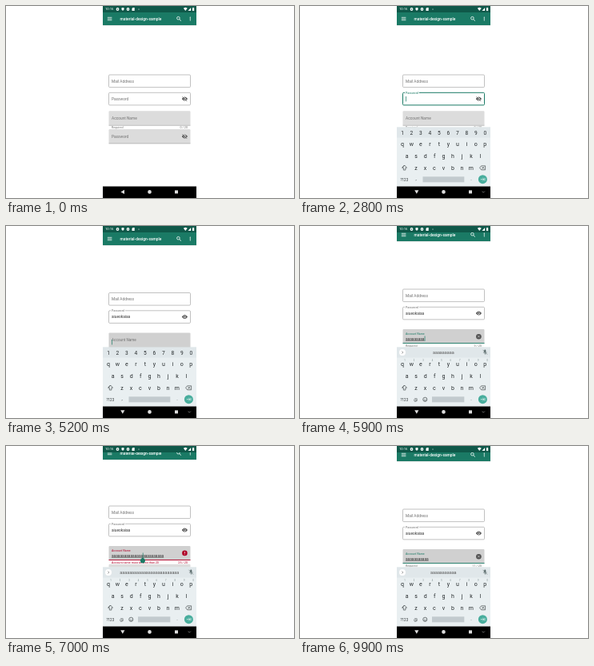
Write an HTML page with a canvas that moves like this. It is 360 px wide and 240 px high and loops after 10000 ms.

```html
<!DOCTYPE html>
<html lang="en">
<head>
<meta charset="utf-8">
<title>Text fields</title>
<style>
html, body { margin: 0; width: 100%; height: 100%; overflow: hidden; background: #fff; }
canvas { display: block; width: 360px; height: 240px; }
</style>
</head>
<body>
<canvas id="stage"></canvas>
<script>
const LOOP = 10000, STEP = 100;
const TEAL = '#1a7a65', DARK = '#0f5849', RED = '#b00028', INK = '#303030', GREY = '#707070';
const LEFT = 128.5, WIDTH = 102, PAD = 132, ICON_X = 223.4;
const SECRET = 'aiueokaiaa';

const canvas = document.getElementById('stage');
const ctx = canvas.getContext('2d');
const dpr = window.devicePixelRatio || 1;
canvas.width = 360 * dpr;
canvas.height = 240 * dpr;

const clamp = (v, lo, hi) => Math.min(hi, Math.max(lo, v));
const mix = (a, b, k) => a + (b - a) * k;
const ease = (t, from, to) => {
  const k = clamp((t - from) / (to - from), 0, 1);
  return k * k * (3 - 2 * k);
};

function rect(x, y, w, h, color) {
  ctx.fillStyle = color;
  ctx.fillRect(x, y, w, h);
}

function round(x, y, w, h, r) {
  ctx.beginPath();
  ctx.roundRect(x, y, w, h, r);
}

function dot(x, y, r, color) {
  ctx.fillStyle = color;
  ctx.beginPath();
  ctx.arc(x, y, r, 0, 7);
  ctx.fill();
}

function ring(x, y, r, color, w) {
  ctx.strokeStyle = color;
  ctx.lineWidth = w;
  ctx.beginPath();
  ctx.arc(x, y, r, 0, 7);
  ctx.stroke();
}

function trace(points) {
  ctx.beginPath();
  for (let i = 0; i < points.length; i += 2) ctx.lineTo(points[i], points[i + 1]);
}

function line(points, color, w) {
  ctx.strokeStyle = color;
  ctx.lineWidth = w;
  trace(points);
  ctx.stroke();
}

function poly(points, color) {
  ctx.fillStyle = color;
  trace(points);
  ctx.fill();
}

// Vertically centred on the x-height; returns the width.
function text(str, x, y, size, color, align = 'left', weight = 400) {
  ctx.font = `${weight} ${size}px Roboto, sans-serif`;
  ctx.textAlign = align;
  ctx.textBaseline = 'alphabetic';
  ctx.fillStyle = color;
  ctx.fillText(str, x, y + size * 0.35);
  return ctx.measureText(str).width;
}

function state(t) {
  const s = { t };
  s.focus = t < 300 ? '' : t < 2400 ? 'mail' : t < 5100 ? 'pass' : 'name';
  s.mail = clamp(t <= 1700 ? Math.floor((t - 600) / 200) : 5 - (t - 1700) / 100, 0, 5);
  s.pass = clamp(Math.floor((t - 2750) / 150), 0, SECRET.length);
  s.shown = t >= 4700;

  if (t < 7700) s.name = clamp(Math.floor((t - 5450) / 46), 0, 25);
  else if (t < 8700) s.name = Math.max(0, 25 - (t - 7600) / 100 * 4);
  else s.name = t >= 9900 ? 11 : Math.min(10, (t - 8700) / 100);
  s.error = s.name > 20;
  s.handle = t >= 6900 && t < 7700;

  const grow = ease(t, 2800, 3100), scroll = ease(t, 5250, 5550);
  const wrap = ease(t, 6350, 6550) - ease(t, 7700, 8000);
  s.mailY = 86 - 2.5 * grow - 4.5 * scroll - 4 * wrap;
  s.passY = s.mailY + 22.3;
  s.nameY = s.passY + 23 + 4.6 * grow;
  s.barY = -5 * scroll - 2 * wrap;

  s.mailFloat = ease(t, 250, 480) - ease(t, 2350, 2580);
  s.passFloat = ease(t, 2350, 2580);
  s.nameFloat = ease(t, 5150, 5400);
  s.keys = ease(t, 200, 600);
  s.digits = t >= 2400 && t < 5350;
  return s;
}

function eye(y, open) {
  const x = ICON_X, c = '#4c4c4c';
  ctx.fillStyle = c;
  ctx.beginPath();
  ctx.moveTo(x - 3.6, y);
  ctx.quadraticCurveTo(x, y - 5, x + 3.6, y);
  ctx.quadraticCurveTo(x, y + 5, x - 3.6, y);
  ctx.fill();
  dot(x, y, 1.6, '#fff');
  dot(x, y, 1, c);
  if (!open) {
    line([x - 2.4, y - 3.2, x + 3.4, y + 2.6], '#fff', 0.6);
    line([x - 2.9, y - 2.8, x + 2.9, y + 3], c, 0.7);
  }
}

function caret(x, y) {
  rect(x + 0.2, y - 3.2, 0.7, 6.4, TEAL);
}

function outlined(label, y, float, focused) {
  ctx.strokeStyle = focused ? TEAL : '#989898';
  ctx.lineWidth = focused ? 1 : 0.6;
  round(LEFT, y, WIDTH, 15.6, 1.2);
  ctx.stroke();
  const size = mix(4.8, 3.6, float), ly = mix(y + 7.9, y + 0.4, float);
  if (float > 0.5) {
    ctx.font = `400 ${size}px Roboto, sans-serif`;
    rect(PAD - 1, y - 1, ctx.measureText(label).width + 2, 2, '#fff');
  }
  text(label, PAD, ly, size, focused ? TEAL : GREY);
}

function filled(label, y, float, focused, error) {
  ctx.fillStyle = focused ? '#d0d0d0' : '#dcdcdc';
  round(LEFT, y, WIDTH, 18, [1.2, 1.2, 0, 0]);
  ctx.fill();
  const accent = error ? RED : focused && float > 0.4 ? TEAL : '';
  rect(LEFT, y + (accent ? 17.2 : 17.6), WIDTH, accent ? 0.9 : 0.5, accent || '#909090');
  text(label, PAD, mix(y + 8.8, y + 5.6, float), mix(4.8, 3.6, float), accent || GREY);
}

function composing(n, y) {
  const w = text('a'.repeat(n), PAD, y, 4.8, INK);
  if (n) rect(PAD, y + 2.3, w, 0.4, INK);
  return PAD + w;
}

function form(s) {
  outlined('Mail Address', s.mailY, s.mailFloat, s.focus === 'mail');
  const mailEnd = composing(s.mail, s.mailY + 8.7);
  if (s.focus === 'mail') caret(mailEnd, s.mailY + 8.3);

  outlined('Password', s.passY, s.passFloat, s.focus === 'pass');
  let secret = SECRET.slice(0, s.pass);
  if (!s.shown) secret = '•'.repeat(s.pass);
  const passW = text(secret, PAD, s.passY + 8, 4.8, INK);
  if (s.focus === 'pass') caret(PAD + passW, s.passY + 7.9);
  eye(s.passY + 7.8, s.shown);

  const y = s.nameY, focused = s.focus === 'name';
  filled('Account Name', y, s.nameFloat, focused, s.error);
  const nameEnd = composing(s.name, y + 12.2);
  if (focused && s.t < 9900) caret(s.handle ? 170.6 : nameEnd, y + 11.8);
  if (s.error) {
    dot(ICON_X, y + 9, 3.3, RED);
    rect(ICON_X - 0.35, y + 7.2, 0.7, 2.2, '#fff');
    rect(ICON_X - 0.35, y + 10, 0.7, 0.7, '#fff');
  } else if (s.name) {
    const x = ICON_X, cy = y + 9.3;
    dot(x, cy, 3.3, '#505050');
    line([x - 1.3, cy - 1.3, x + 1.3, cy + 1.3], '#ddd', 0.6);
    line([x - 1.3, cy + 1.3, x + 1.3, cy - 1.3], '#ddd', 0.6);
  }
  const note = s.error ? RED : GREY;
  text(s.error ? 'Account name must be less than 20' : 'Required', PAD, y + 20.8, 3.7, note);
  if (s.error) text('characters', PAD, y + 25, 3.7, note);
  text(`${s.name} / 20`, 227, y + 20.8, 3.7, note, 'right');

  filled('Password', y + 22.8, 0, false, false);
  eye(y + 31.6, false);

  if (s.handle) {
    dot(170.9, y + 18.6, 3, TEAL);
    poly([170.9, y + 14.3, 168.5, y + 16.8, 173.3, y + 16.8], TEAL);
  }
}

function appBar(y) {
  rect(121, 8 + y, 117, 16, TEAL);
  rect(121, 24 + y, 117, 0.6, 'rgba(0,0,0,.15)');
  const cy = 16 + y;
  for (const d of [-1.8, 0, 1.8]) {
    rect(126.8, cy + d - 0.35, 5.6, 0.7, '#fff');
    dot(230.3, cy + d, 0.65, '#fff');
  }
  text('material-design-sample', 142.5, cy, 4.9, '#fff', 'left', 500);
  ring(215.4, cy - 0.8, 1.8, '#fff', 0.8);
  line([216.7, cy + 0.5, 218.8, cy + 2.6], '#fff', 0.9);
}

function statusBar() {
  rect(121, 0, 117, 8, DARK);
  text('10:16', 124, 4, 4.2, '#fff');
  dot(139.5, 4, 1.9, '#fff');
  dot(139.5, 4, 0.7, DARK);
  poly([144.3, 2.6, 146, 1.9, 147.7, 2.6, 147.4, 4.6, 146, 6, 144.6, 4.6], '#fff');
  dot(152.5, 4, 1.9, '#fff');
  rect(151.7, 3.6, 1.6, 0.8, DARK);
  poly([157.5, 3, 158.6, 2, 160.7, 2, 160.7, 6, 157.5, 6], '#fff');
  dot(166, 4, 0.6, '#fff');
  poly([221.8, 2.7, 224.3, 1.8, 226.8, 2.7, 224.3, 6], '#fff');
  poly([227.5, 6, 231.2, 2, 231.2, 6], '#fff');
  rect(233, 2.3, 2.2, 3.8, '#fff');
  rect(233.6, 1.8, 1, 0.6, '#fff');
}

function suggestions(word) {
  dot(128, 158, 4, '#fff');
  line([127.3, 156.5, 128.8, 158, 127.3, 159.5], '#555', 0.6);
  text(word, 179.3, 158.3, 5.45, '#555', 'center');
  const x = 231.3, c = '#566';
  ctx.fillStyle = c;
  round(x - 1, 154.4, 2, 4, 1);
  ctx.fill();
  ctx.strokeStyle = c;
  ctx.lineWidth = 0.5;
  ctx.beginPath();
  ctx.arc(x, 157.3, 2, 0, Math.PI);
  ctx.stroke();
  rect(x - 0.25, 159.2, 0.5, 1.6, c);
  line([x - 2.7, 154.8, x + 2.7, 160.6], c, 0.6);
}

function keyRow(chars, x, y, size = 7) {
  [...chars].forEach((ch, i) => text(ch, x + i * 11.47, y, size, '#252a2c', 'center'));
}

function keyboard(s) {
  if (!s.keys) return;
  ctx.save();
  ctx.beginPath();
  ctx.rect(121, 151, 117, 74.5);
  ctx.clip();
  ctx.translate(0, 74.5 * (1 - s.keys));
  rect(121, 151.5, 117, 75, '#e9eff1');
  rect(121, 151.5, 117, 13, '#e0e7ea');
  const icon = '#2d3335';

  if (s.digits) {
    keyRow('1234567890', 128, 158.2, 6.6);
  } else {
    suggestions('a'.repeat(s.focus === 'mail' ? s.mail : s.name));
    [...'1234567890'].forEach((d, i) => text(d, 131 + i * 11.47, 168, 2.6, '#788', 'center'));
  }
  keyRow('qwertyuiop', 128, 172.5);
  keyRow('asdfghjkl', 133.7, 187.3);
  keyRow('zxcvbnm', 145, 202.3);

  line([130.6, 199, 127.7, 202.2, 129.3, 202.2, 129.3, 205, 131.9, 205, 131.9, 202.2,
    133.5, 202.2, 130.6, 199, 127.7, 202.2], icon, 0.6);
  line([224.6, 202.3, 226.6, 199.8, 231.6, 199.8, 231.6, 204.8, 226.6, 204.8, 224.6, 202.3], icon, 0.6);
  line([227.4, 200.9, 230.2, 203.7], icon, 0.6);
  line([227.4, 203.7, 230.2, 200.9], icon, 0.6);

  text('?123', 130.3, 217, 4.5, icon, 'center');
  const spaceX = s.digits ? 153.5 : 165;
  rect(spaceX, 213.3, 205.3 - spaceX, 7, '#c2cace');
  text('.', 214, 216, 6, icon, 'center');
  if (s.digits) {
    text(',', 145, 216, 6, icon, 'center');
  } else {
    text('@', 144.6, 216.7, 5.4, icon, 'center');
    ring(156.3, 216.8, 2.6, icon, 0.6);
    dot(155.3, 216.1, 0.4, icon);
    dot(157.3, 216.1, 0.4, icon);
    ctx.beginPath();
    ctx.arc(156.3, 217, 1.4, 0.2, Math.PI - 0.2);
    ctx.stroke();
  }
  dot(228.4, 216.7, 5.5, '#48ad9d');
  line([225.8, 216.7, 230, 216.7], '#fff', 0.6);
  line([228.4, 215, 230.1, 216.7, 228.4, 218.4], '#fff', 0.6);
  line([231, 214.9, 231, 218.5], '#fff', 0.6);
  ctx.restore();
}

function navBar(open) {
  rect(121, 225.5, 117, 14.5, '#000');
  const c = '#ddd';
  if (open) {
    poly([143.2, 230.3, 148.4, 230.3, 145.8, 234.7], c);
    line([227.7, 231.6, 229.3, 233.2, 230.9, 231.6], '#999', 0.7);
  } else {
    poly([148, 229.8, 148, 235, 143.4, 232.4], c);
  }
  dot(179.5, 232.4, 2.3, c);
  rect(211, 230.4, 4, 4, c);
}

function draw(now) {
  const s = state(Math.floor(now % LOOP / STEP) * STEP);
  ctx.setTransform(dpr, 0, 0, dpr, 0, 0);
  rect(0, 0, 360, 240, '#fff');
  form(s);
  appBar(s.barY);
  statusBar();
  keyboard(s);
  navBar(s.keys > 0);
}

let start;
function tick(now) {
  if (start === undefined) start = now;
  draw(now - start);
  requestAnimationFrame(tick);
}
draw(0);
requestAnimationFrame(tick);
</script>
</body>
</html>
```
